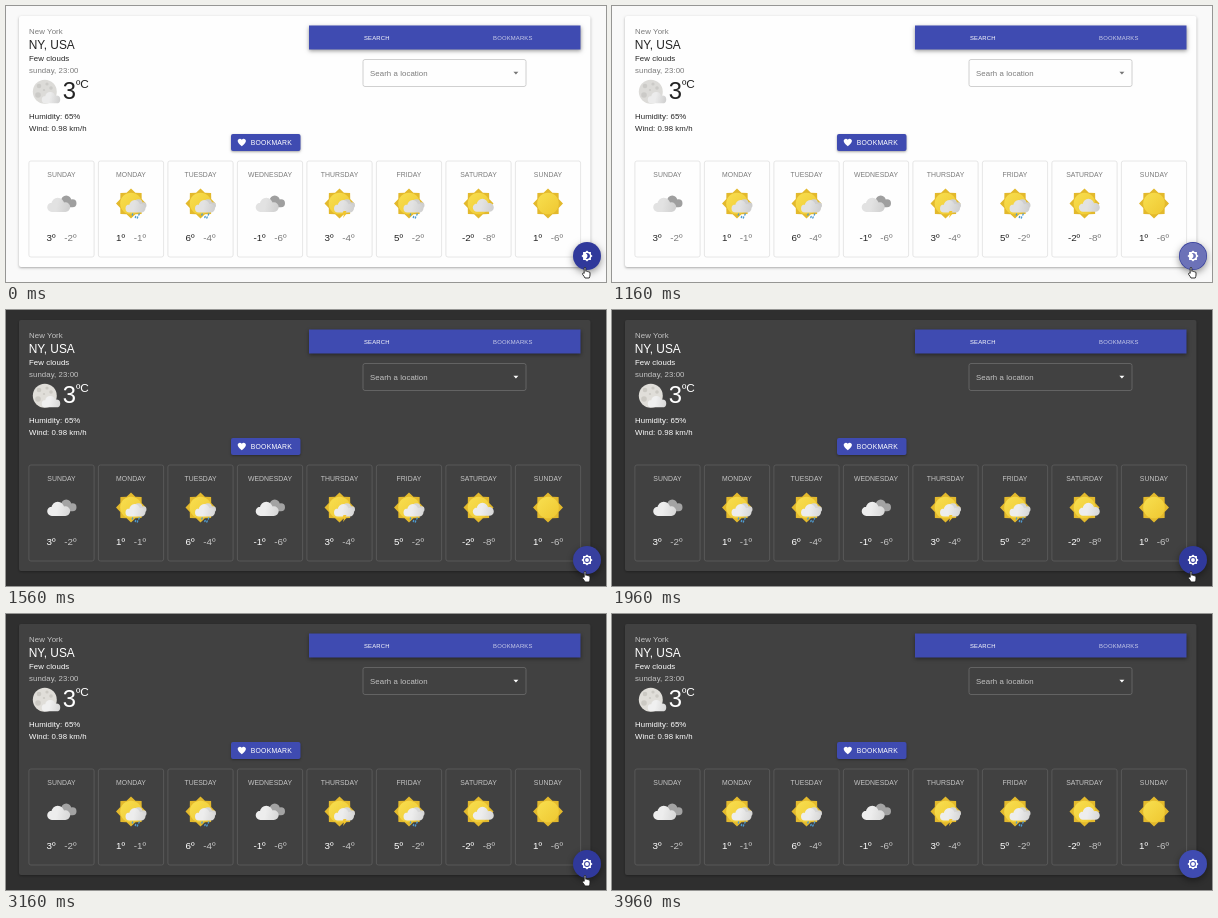
Animation of 600x276 px, one loop 4 s. Source, as an HTML page with a canvas:

```html
<!DOCTYPE html>
<html lang="en">
<head>
<meta charset="utf-8">
<title>Weather dashboard</title>
<style>
html, body { margin: 0; width: 600px; height: 276px; overflow: hidden; }
canvas { display: block; }
</style>
</head>
<body>
<canvas id="stage" width="600" height="276"></canvas>
<script>
const c = document.getElementById('stage').getContext('2d');
const LOOP = 4000, PRESS = 900, SWITCH = 1170, LEAVE = 3700;
const BLUE = [63, 75, 177], DEEP = [48, 57, 155];
const LIGHT = {
  page: '#f9f9f9', paper: '#fefefe', line: '#e0e0e0', field: '#c4c4c4',
  text: '#242424', soft: '#7b7b7b', arrow: '#757575',
  cloud: '#e2e2e2', shade: '#cecece', back: '#9f9f9f'
};
const DARK = {
  page: '#2f2f2f', paper: '#414141', line: '#5d5d5d', field: '#6d6d6d',
  text: '#ffffff', soft: '#c4c4c4', arrow: '#ffffff',
  cloud: '#ededed', shade: '#d6d6d6', back: '#a3a3a3'
};
const DAYS = [
  ['SUNDAY', 'cloudy', 3, -2], ['MONDAY', 'rain', 1, -1],
  ['TUESDAY', 'rain', 6, -4], ['WEDNESDAY', 'cloudy', -1, -6],
  ['THURSDAY', 'storm', 3, -4], ['FRIDAY', 'rain', 5, -2],
  ['SATURDAY', 'partly', -2, -8], ['SUNDAY', 'clear', 1, -6]
];
const STAR = 'M20 8.69V4h-4.69L12 .69 8.69 4H4v4.69L.69 12 4 15.31V20h4.69L12 23.31 15.31 20H20v-4.69L23.31 12z';
const MOON_ICON = new Path2D(STAR + 'M12 18c-.89 0-1.74-.2-2.5-.55C11.56 16.5 13 14.42 13 12s-1.44-4.5-3.5-5.45C10.26 6.2 11.11 6 12 6c3.31 0 6 2.69 6 6s-2.69 6-6 6z');
const SUN_ICON = new Path2D(STAR + 'M18 12a6 6 0 1 0-12 0a6 6 0 1 0 12 0zM16 12a4 4 0 1 0-8 0a4 4 0 1 0 8 0z');
const HEART = new Path2D('M12 21.35l-1.45-1.32C5.4 15.36 2 12.28 2 8.5 2 5.42 4.42 3 7.5 3c1.74 0 3.41.81 4.5 2.09C13.09 3.81 14.76 3 16.5 3 19.58 3 22 5.42 22 8.5c0 3.78-3.4 6.86-8.55 11.54z');
const HAND = new Path2D('M2.2 6.3V1.2Q2.2.4 3 .4T3.8 1.2V4.3Q4.6 3.8 5.3 4.5Q6.2 4.1 6.7 4.9Q8 4.7 8 6V8Q8 9.3 7.2 11H3Q2.2 9.3.6 7.4Q.3 6.2 1.3 6z');

const clamp = v => Math.min(1, Math.max(0, v));
const ease = v => { v = clamp(v); return v * v * (3 - 2 * v); };
const mix = (a, b, k) => a.map((v, i) => v + (b[i] - v) * k);
const rgb = v => `rgb(${v.map(Math.round)})`;

function text(s, x, y, size, color, align = 'left', spacing = 0.009) {
  c.font = `${size}px "Liberation Sans", Arial, sans-serif`;
  c.letterSpacing = spacing * size + 'px';
  c.textAlign = align;
  c.fillStyle = color;
  c.fillText(s, x, y);
}

function box(x, y, w, h, r, fill, stroke) {
  c.beginPath();
  c.roundRect(x, y, w, h, r);
  if (fill) { c.fillStyle = fill; c.fill(); }
  if (stroke) { c.lineWidth = 0.8; c.strokeStyle = stroke; c.stroke(); }
}

function disc(x, y, r, fill) {
  c.beginPath();
  c.arc(x, y, r, 0, Math.PI * 2);
  c.fillStyle = fill;
  c.fill();
}

function poly(fill, ...pts) {
  c.beginPath();
  pts.forEach(p => c.lineTo(...p));
  c.closePath();
  c.fillStyle = fill;
  c.fill();
}

function shadow(alpha, dy, blur, draw) {
  c.save();
  c.shadowColor = `rgba(0,0,0,${alpha})`;
  c.shadowOffsetY = dy;
  c.shadowBlur = blur;
  draw();
  c.restore();
}

function icon(path, x, y, scale, fill) {
  c.save();
  c.translate(x - 12 * scale, y - 12 * scale);
  c.scale(scale, scale);
  c.fillStyle = fill;
  c.fill(path, 'evenodd');
  c.restore();
}

function cloud(x, y, w, fill, shade) {
  const g = c.createLinearGradient(x - w / 2, y, x + w / 2, y + w * 0.2);
  g.addColorStop(0.4, fill);
  g.addColorStop(1, shade);
  c.beginPath();
  for (const [dx, dy, r] of [[-0.3, 0.1, 0.2], [-0.04, -0.05, 0.27], [0.29, 0.09, 0.21]]) {
    c.moveTo(x + (dx + r) * w, y + dy * w);
    c.arc(x + dx * w, y + dy * w, r * w, 0, Math.PI * 2);
  }
  c.rect(x - 0.3 * w, y, 0.59 * w, 0.3 * w);
  c.fillStyle = g;
  c.fill();
}

function sun(x, y) {
  const pts = [];
  for (let i = 0; i < 16; i++) {
    const a = i * Math.PI / 8, r = i % 2 ? 11.6 : 15;
    pts.push([x + r * Math.sin(a), y - r * Math.cos(a)]);
  }
  poly('#e3b92c', ...pts);
  const g = c.createLinearGradient(x - 8, y - 8, x + 8, y + 8);
  g.addColorStop(0, '#f7dc4c');
  g.addColorStop(1, '#f0cb35');
  disc(x, y, 10.8, g);
}

function weather(kind, x, p) {
  if (kind === 'cloudy') {
    cloud(x + 5.5, 195.5, 19, p.back, p.back);
    cloud(x - 2.8, 199, 23, p.cloud, p.shade);
    return;
  }
  sun(x, 197.5);
  if (kind === 'clear') return;
  if (kind === 'partly') {
    cloud(x + 4.8, 199.5, 21, p.cloud, p.shade);
    return;
  }
  cloud(x + 8, 198, 15, p.shade, p.shade);
  cloud(x + 4.5, 200.5, 20, p.cloud, p.shade);
  if (kind === 'rain') {
    for (const [dx, y] of [[1.5, 208.5], [4.5, 211], [8, 208.5], [6.5, 211.5]]) {
      c.beginPath();
      c.ellipse(x + dx, y, 0.75, 1.4, 0.3, 0, Math.PI * 2);
      c.fillStyle = '#4f9bd0';
      c.fill();
    }
  } else {
    poly('#f3c62d', [x + 4, 205], [x + 7, 205], [x + 5.7, 207.5],
      [x + 7.2, 207.5], [x + 3.5, 212], [x + 4.4, 208.5], [x + 2.8, 208.5]);
  }
}

function night(p) {
  const dark = p === DARK;
  disc(38.8, 85.8, 12, dark ? '#e0ded9' : '#dcdbd8');
  const spot = dark ? '#cbc9c3' : '#cbcac7';
  for (const [x, y, r] of [[33, 80, 2.3], [41, 78, 1.6], [32, 89, 2.8], [45, 82, 1.8], [38, 84, 1.1]])
    disc(x, y, r, spot);
  cloud(45, 91.8, 18.5, dark ? '#f0f0f0' : '#ececec', p.shade);
}

function current(p) {
  text('New York', 23, 28, 7.84, p.soft);
  text('NY, USA', 22.7, 43, 11.9, p.text, 'left', 0);
  text('Few clouds', 23, 55.3, 7.84, p.text);
  text('sunday, 23:00', 23, 67.2, 7.84, p.soft);
  night(p);
  text('3', 56.8, 92.6, 23.8, p.text, 'left', 0);
  text('ºC', 70, 82, 11.8, p.text, 'left', 0);
  text('Humidity: 65%', 23, 112.7, 7.84, p.text);
  text('Wind: 0.98 km/h', 23, 124.5, 7.84, p.text);
}

function controls(p, t) {
  const blue = rgb(BLUE);
  shadow(0.4, 1.5, 4, () => box(303, 19.5, 271.5, 24, 0, blue));
  text('SEARCH', 370.8, 33.5, 5.9, '#fff', 'center', 0.0286);
  text('BOOKMARKS', 506.8, 33.5, 5.9, 'rgba(255,255,255,.72)', 'center', 0.0286);

  box(357, 53.5, 163, 27, 2, null, p.field);
  let hint = LIGHT.soft;
  if (p === DARK) {
    const k = ease((t - SWITCH - 20) / 200);
    hint = rgb(mix([30, 30, 30], [196, 196, 196], k));
  }
  text('Searh a location', 364, 69.7, 7.84, hint);
  poly(p.arrow, [507.4, 65.8], [512.4, 65.8], [509.9, 68.4]);

  shadow(0.35, 1, 2.5, () => box(225, 128, 69.5, 17, 2, blue));
  icon(HEART, 235.8, 136.5, 0.41, '#fff');
  text('BOOKMARK', 244.8, 139, 6.86, '#fff', 'left', 0.0286);
}

function forecast(p) {
  DAYS.forEach(([day, kind, high, low], i) => {
    const x = 22.9 + i * 69.5, mid = x + 32.6;
    box(x, 155, 65.2, 96, 2, null, p.line);
    text(day, mid, 170.7, 6.86, p.soft, 'center', 0.007);
    weather(kind, mid, p);
    const a = high + 'º', b = low + 'º', size = 9.8;
    c.font = `${size}px "Liberation Sans", Arial, sans-serif`;
    c.letterSpacing = '0px';
    const wa = c.measureText(a).width, wb = c.measureText(b).width;
    const left = mid - (wa + wb + 8.6) / 2;
    text(a, left, 234.5, size, p.text, 'left', 0);
    text(b, left + wa + 8.6, 234.5, size, p.soft, 'left', 0);
  });
}

function themeButton(p, t) {
  const x = 581, y = 250, r = 14;
  const fill = rgb(mix(DEEP, BLUE, ease((t - LEAVE) / 250)));
  shadow(0.42, 2.5, 7, () => disc(x, y, r, fill));
  const grow = ease((t - PRESS) / 300);
  const fade = 1 - ease((t - SWITCH - 40) / 450);
  if (grow > 0 && fade > 0) disc(x, y, r * grow, `rgba(255,255,255,${0.29 * fade})`);
  icon(p === DARK ? SUN_ICON : MOON_ICON, x, y, 0.49, '#fff');
}

function pointer() {
  c.save();
  c.translate(576, 261);
  c.lineJoin = 'round';
  c.lineWidth = 0.9;
  c.fillStyle = '#fff';
  c.strokeStyle = '#202020';
  c.fill(HAND);
  c.stroke(HAND);
  c.restore();
}

function draw(t) {
  const p = t < SWITCH ? LIGHT : DARK;
  c.fillStyle = p.page;
  c.fillRect(0, 0, 600, 276);
  shadow(0.32, 1, 2.5, () => box(13, 10, 571.5, 251, 2, p.paper));
  current(p);
  controls(p, t);
  forecast(p);
  themeButton(p, t);
  if (t < LEAVE) pointer();
}

const start = performance.now();
function tick() {
  draw((performance.now() - start) % LOOP);
  requestAnimationFrame(tick);
}
tick();
</script>
</body>
</html>
```
